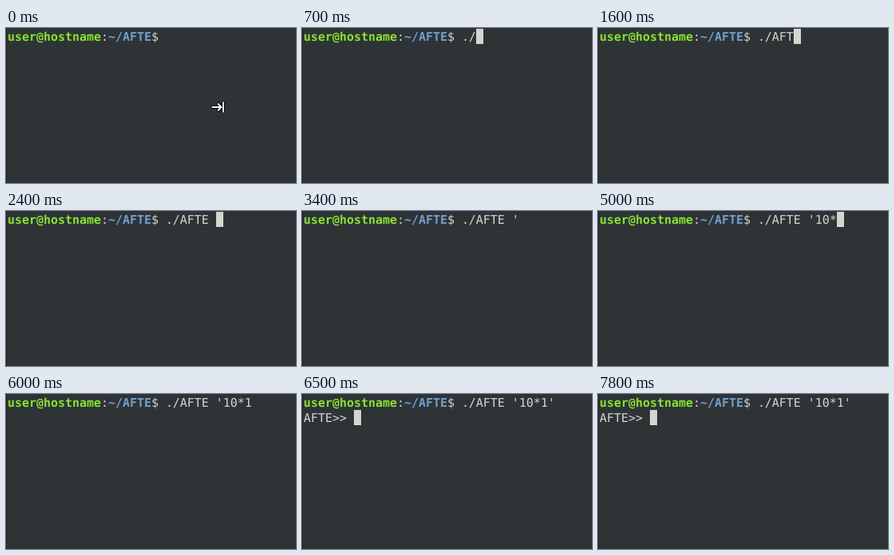
These frames come from a looping animation (363 px wide and 194 px high, 8000 ms). An HTML page:

```html
<!DOCTYPE html>
<html lang="en">
<head>
<meta charset="utf-8">
<title>Terminal</title>
<style>
  html, body { margin: 0; width: 100%; height: 100%; overflow: hidden; background: #2e3436; }
  svg { display: block; width: 363px; height: 194px; }
  text {
    font: 14.95px "DejaVu Sans Mono", monospace;
    fill: #d3d7cf;
    white-space: pre;
    text-rendering: geometricPrecision;
  }
  .user { font-weight: bold; fill: #8ae234; }
  .path { font-weight: bold; fill: #729fcf; }
  .caret, .block, .reply, .pointer { animation: 8s step-end infinite; }
  .caret { animation-name: type; }
  .block { animation-name: blink; }
  .reply { animation-name: reply; }
  .pointer { animation-name: drift; }

  /* one cell is 9 by 19 pixels */
  @keyframes type {
    0% { transform: translate(200px, 1px); }
    5% { transform: translate(209px, 1px); }
    8.75% { transform: translate(218px, 1px); }
    13.75% { transform: translate(227px, 1px); }
    18.75% { transform: translate(236px, 1px); }
    20% { transform: translate(245px, 1px); }
    22.5% { transform: translate(254px, 1px); }
    30% { transform: translate(263px, 1px); }
    35% { transform: translate(272px, 1px); }
    52.5% { transform: translate(281px, 1px); }
    56.25% { transform: translate(290px, 1px); }
    62.5% { transform: translate(299px, 1px); }
    68.75% { transform: translate(308px, 1px); }
    80% { transform: translate(317px, 1px); }
    81.25%, 100% { transform: translate(65px, 20px); }
  }
  @keyframes blink {
    0%, 42.5%, 75%, 90% { opacity: 0; }
    1.25%, 50%, 80%, 97.5%, 100% { opacity: 1; }
  }
  @keyframes reply {
    0% { opacity: 0; }
    81.25%, 100% { opacity: 1; }
  }
  @keyframes drift {
    0% { transform: none; opacity: 1; }
    1.25% { transform: translate(3px, 1px); opacity: 1; }
    2.5% { transform: translate(6px, 2px); opacity: 1; }
    5%, 100% { transform: none; opacity: 0; }
  }
</style>
</head>
<body>
<svg viewBox="0 0 363 194">
  <rect width="363" height="194" fill="#2e3436"/>
  <text x="2" y="16"><tspan class="user">user@hostname</tspan>:<tspan class="path">~/AFTE</tspan>$ ./AFTE '10*1'</text>
  <text class="reply" x="2" y="35">AFTE&gt;&gt;</text>
  <!-- the cover hides what is not typed yet -->
  <g class="caret">
    <rect width="170" height="19" fill="#2e3436"/>
    <rect class="block" width="9" height="19" fill="#d3d7cf"/>
  </g>
  <g class="pointer" fill="none">
    <path id="arrow" d="M258 99H269M264.5 94L269.5 99L264.5 104M272 92.5V105.5" stroke="#000" stroke-width="4"/>
    <use href="#arrow"/>
    <path d="M258 99H269M265 94.5L269.5 99L265 103.5M272 92.5V105.5" stroke="#fff" stroke-width="2"/>
  </g>
  <rect width="1" height="194" fill="#1b1f20"/>
</svg>
</body>
</html>
```
